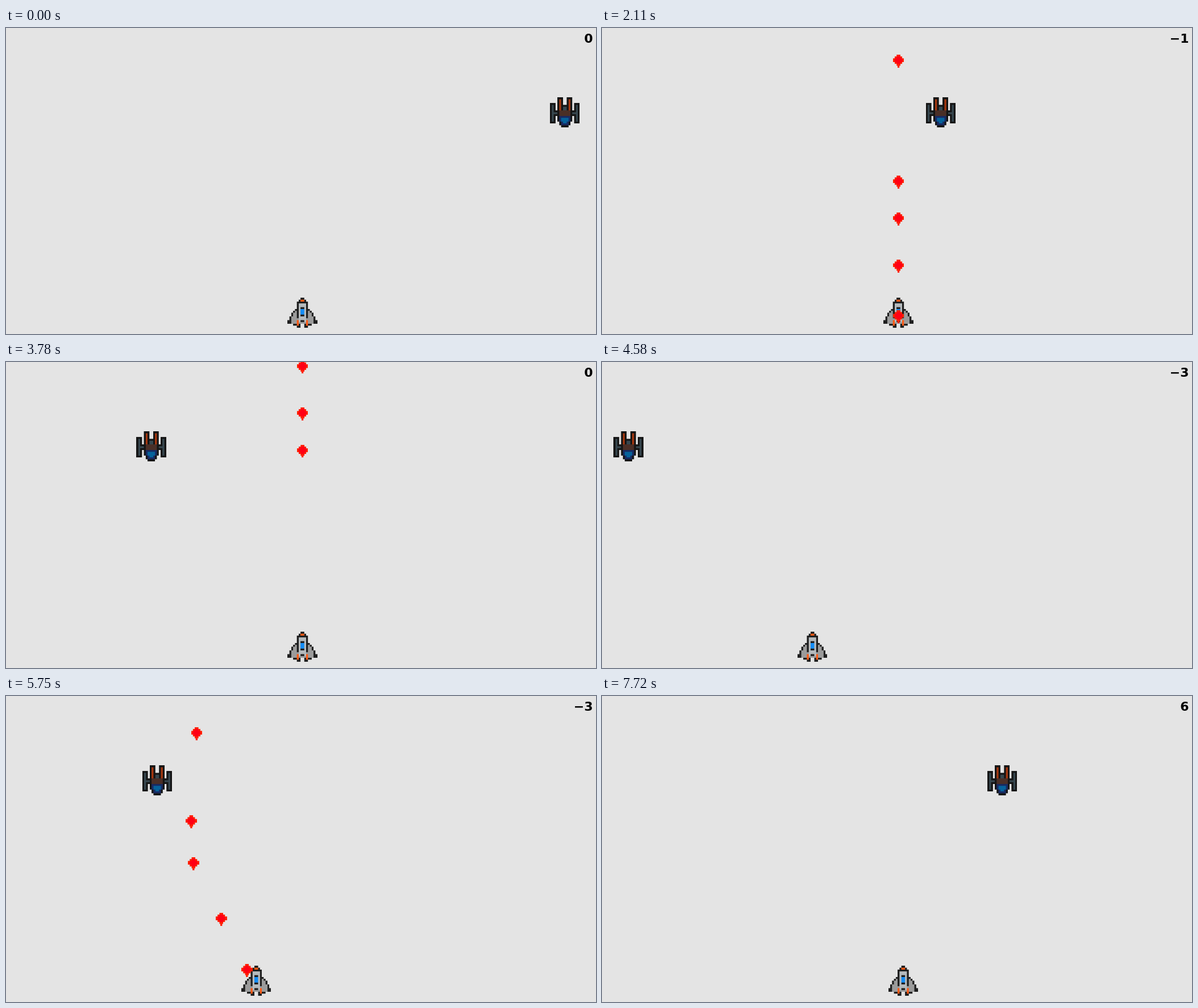
Write an HTML page with a canvas that moves like this. It is 1038x539 px and loops after 7.82 s.

```html
<!DOCTYPE html>
<html lang="en">
<head>
<meta charset="utf-8">
<title>Space shooter</title>
<style>
  html, body { margin: 0; height: 100%; overflow: hidden; background: #e4e4e4; }
  canvas { display: block; }
</style>
</head>
<body>
<canvas id="stage" width="1038" height="539"></canvas>
<script>
const ctx = document.getElementById('stage').getContext('2d');
const LOOP = 7820, TICK = 18.4;
const SCALE = 0.8167, SPEED = 0.2224, BULLET_SPEED = 2 * SPEED;
const ENEMY_Y = 122.3, ENEMY_RANGE = 998, SHIP_Y = 475.3, MUZZLE_Y = 497;

const clamp = (v, low, high) => Math.min(high, Math.max(low, v));

// Pixel art on a grid of 4-pixel cells, mirrored left to right.
function sprite(cols, rows, paint) {
  const canvas = document.createElement('canvas');
  canvas.width = cols * 4;
  canvas.height = rows * 4;
  const art = canvas.getContext('2d');
  const block = (color, x, y, w, h) => {
    art.fillStyle = color;
    for (const left of [x, cols - x - w]) art.fillRect(left * 4, y * 4, w * 4, h * 4);
  };
  const row = (color, y, half) => block(color, cols / 2 - half, y, half, 1);
  paint(block, row);
  return canvas;
}

const ship = sprite(16, 16, (block, row) => {
  const black = '#1f1f1f', metal = '#b5babd', orange = '#ff5a14';
  for (let y = 6; y < 14; y++) {
    const half = 8 - Math.floor((13 - y) / 1.75);
    row(black, y, half);
    row('#9b9b9b', y, Math.max(0, half - (y > 11 ? 2 : 1)));
  }
  row(black, 0, 1);
  row(black, 1, 2);
  row(orange, 1, 1);
  block(black, 5, 2, 3, 9);
  block(metal, 6, 3, 2, 10);
  block(black, 7, 5, 1, 5);
  block('#148cf5', 7, 6, 1, 3);
  block(black, 7, 12, 1, 1);
  block(black, 3, 14, 4, 1);
  block(black, 5, 15, 2, 1);
  block(orange, 5, 12, 1, 3);
});

const enemy = sprite(16, 16, (block, row) => {
  const black = '#151515', slate = '#37474f';
  const tube = (color, x, y, h) => {
    block(black, x, y, 3, h);
    block(color, x + 1, y + 1, 1, h - 2);
  };
  tube(slate, 0, 3, 11);
  tube('#a5370f', 4, 0, 8);
  block(black, 3, 7, 2, 3);
  block(slate, 2, 8, 3, 1);
  block(black, 7, 4, 1, 3);
  block(slate, 7, 5, 1, 2);
  for (let y = 7; y < 16; y++) {
    const half = Math.min(4, Math.floor((20 - y) / 2));
    row(black, y, half);
    if (y < 15) row(y < 10 ? '#4a2f27' : '#182a62', y, half - 1);
    if (y > 10 && y < 14) row('#06629b', y, half - 2);
  }
});

const bullet = sprite(6, 7, (block, row) => {
  for (let y = 0; y < 6; y++) {
    const half = Math.min(3, 1 + Math.min(y, 5 - y));
    row('#ff2000', y, half);
    row('#ff0014', y, half - 1);
  }
  row('#ff2000', 6, 0.5);
});

// The enemy patrols at constant speed and turns at both ends.
function enemyX(t) {
  const travelled = (957 + SPEED * t) % (2 * ENEMY_RANGE);
  return ENEMY_RANGE - Math.abs(travelled - ENEMY_RANGE);
}

// The player steers left once, then right.
const shipX = t => 495.3 + SPEED * (clamp(t - 5235, 0, 918) - clamp(t - 3900, 0, 880));

// Follow each shot until it meets the enemy or leaves at the top.
function flyShot(fired) {
  const x = shipX(fired - TICK) + 16.5;
  const yAt = t => MUZZLE_Y - (t - fired) * BULLET_SPEED;
  let end = fired, points = 0;
  while (!points) {
    end += TICK;
    const dx = x - 16.5 - enemyX(end), y = yAt(end);
    if (Math.abs(dx) < 36 && y < ENEMY_Y + 52 && y > ENEMY_Y - 23) points = 2;
    else if (y < -24) points = -1;
  }
  return { fired, x, yAt, end, points };
}

const shots = [874, 1098, 1577, 1723, 1910, 2110, 2517, 2702, 2850,
  4756, 5105, 5271, 5491, 5694, 5898].map(flyShot);

// The picture refreshes about every 150 ms; key points hold [refresh, time].
const pace = [[0, 0], [6, 930], [19, 2850], [30, 4580], [38, 5750], [51, 7720], [52, LOOP]];

function refreshTime(i) {
  const next = pace.findIndex(([n]) => n > i);
  const [n0, t0] = pace[next - 1], [n1, t1] = pace[next];
  return Math.round((t0 + (t1 - t0) * (i - n0) / (n1 - n0)) / 10) * 10;
}

const refreshes = Array.from({ length: 52 }, (_, i) => refreshTime(i));

function draw(image, x, y) {
  ctx.drawImage(image, x, y, image.width * SCALE, image.height * SCALE);
}

function render(t) {
  ctx.fillStyle = '#e4e4e4';
  ctx.fillRect(0, 0, 1038, 539);
  draw(enemy, enemyX(t), ENEMY_Y);
  draw(ship, shipX(t), SHIP_Y);
  let score = 0;
  for (const { fired, x, yAt, end, points } of shots) {
    if (t >= end) score += points;
    else if (t >= fired) draw(bullet, x, yAt(t));
  }
  ctx.fillStyle = '#000';
  ctx.font = 'bold 22px "DejaVu Sans", sans-serif';
  ctx.textAlign = 'right';
  ctx.fillText(String(score).replace('-', '\u2212'), 1032.5, 25.5);
}

function loop() {
  const now = performance.now() % LOOP;
  render(refreshes.findLast(time => time <= now));
  requestAnimationFrame(loop);
}
loop();
</script>
</body>
</html>
```
